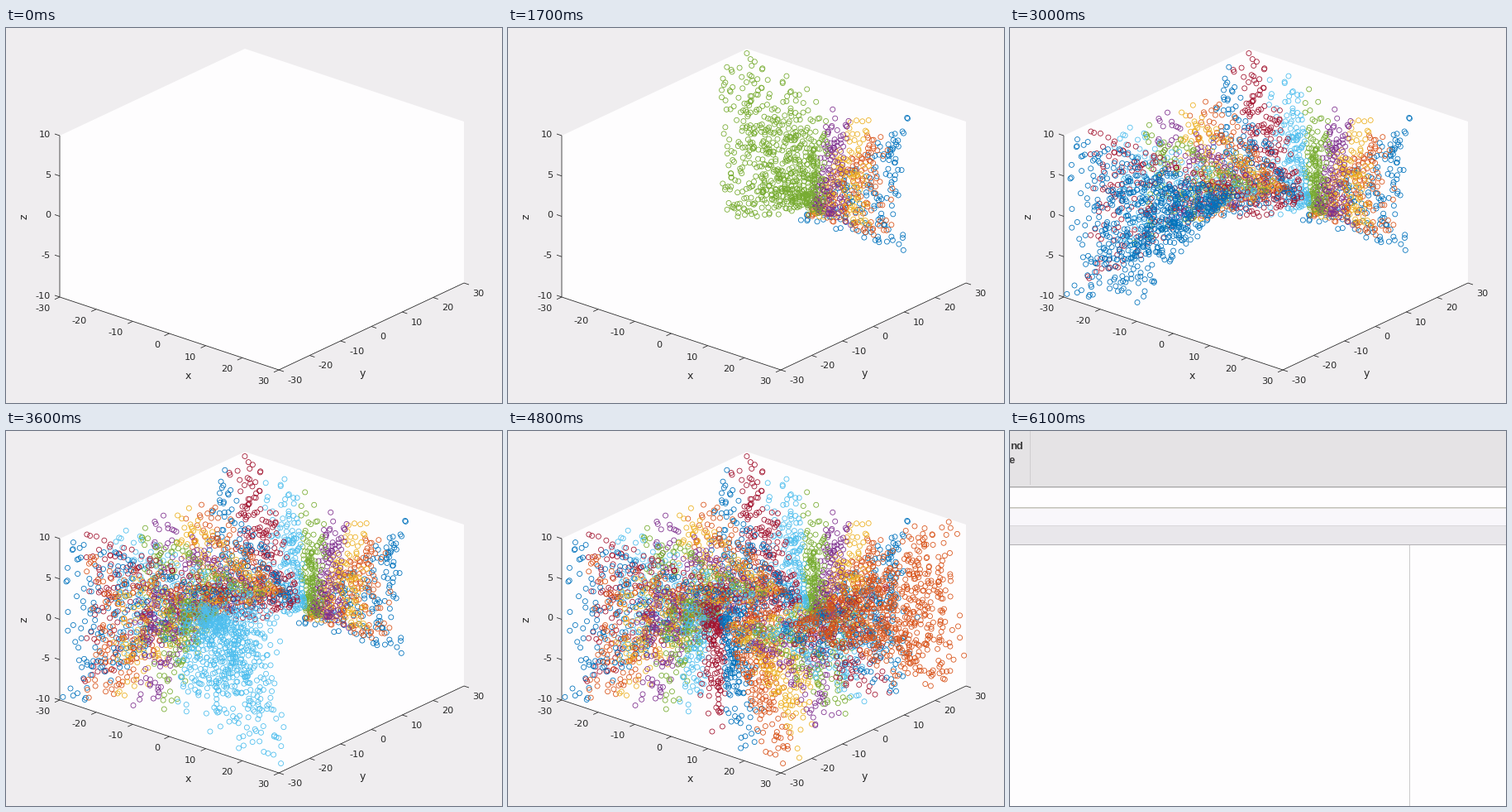
Animation, 600 px wide and 453 px high, one loop 6700 ms. Source, as a matplotlib script:

```python
import numpy as np
import matplotlib.pyplot as plt
from matplotlib.animation import FuncAnimation
from matplotlib.collections import LineCollection
from matplotlib.patches import Polygon, Rectangle

W, H, DPI = 600, 453, 100
PX = 72 / DPI
FRAMES, INTERVAL = 67, 100
DESKTOP_FRAME = 52
INK = "#262626"
COLORS = np.array(["#0072bd", "#d95319", "#edb120", "#7e2f8e",
                   "#77ac30", "#4dbeee", "#a2142f"])

# Sweep geometry: each beam leaves tangentially from a small circle.
START, STEP, SPREAD = 65, 11.25, 40
BATCHES = 32
N_POINTS = 5200


def project(x, y, z):
    """Orthographic view of the 60 x 60 x 20 box in stage pixels."""
    sx = 309.5 + 4.417 * x + 3.733 * y
    sy = 219 + 1.467 * x - 1.75 * y - 9.75 * z
    return sx, sy


def make_cloud():
    rng = np.random.default_rng(11)
    n = 3 * N_POINTS
    first = START + STEP
    phi = rng.uniform(first, START + STEP * BATCHES + STEP, n)
    r = 46 * rng.random(n) ** 0.6
    a, base = np.radians(phi), np.radians(phi - 75)
    x = 9.5 * np.cos(base) + r * np.cos(a)
    y = 9.5 * np.sin(base) + r * np.sin(a)
    z = r * rng.uniform(-0.29, 0.29, n)
    inside = (abs(x) < 29.8) & (abs(y) < 29.8) & (abs(z) < 9.8)
    keep = np.flatnonzero(inside)[:N_POINTS]
    keep = keep[np.argsort(phi[keep])]
    return phi[keep], np.column_stack(project(x[keep], y[keep], z[keep]))


def batch_at(frame):
    if frame < 11:
        return 0
    return int(np.interp(frame, [11, 13, 22, 30, 41, 48, 51],
                         [1, 2.5, 8.5, 15.5, 24.5, 30.5, BATCHES]))


fig = plt.figure(figsize=(W / DPI, H / DPI), dpi=DPI, facecolor="#efedef")
ax = fig.add_axes([0, 0, 1, 1])
ax.set_xlim(0, W)
ax.set_ylim(H, 0)
ax.axis("off")


def label(x, y, text, size=11.3, **kw):
    style = dict(family="DejaVu Sans", color=INK, va="baseline") | kw
    return ax.text(x, y, text, fontsize=size * PX, **style)


def draw_axes():
    corners = [(-30, -30, 10), (-30, 30, 10), (30, 30, 10),
               (30, 30, -10), (30, -30, -10), (-30, -30, -10)]
    outline = [project(*c) for c in corners]
    ax.add_patch(Polygon(outline, fc="#fefdfe", ec="none", zorder=0))

    lines = [[outline[0], outline[5], outline[4], outline[3]]]

    def tick(point, dx, dy):
        lines.append([point, (point[0] + dx, point[1] + dy)])

    for v in range(-30, 31, 10):
        p = project(v, -30, -10)
        tick(p, -6, 2.8)
        label(p[0] - 11.5, p[1] + 17, str(v), ha="right")
        p = project(30, v, -10)
        tick(p, 6, 2)
        label(p[0] + 10.5, p[1] + 15.5, str(v), ha="left")
    for v in range(-10, 11, 5):
        p = project(-30, -30, v)
        tick(p, -6, -2)
        label(p[0] - 11, p[1] + 2, str(v), ha="right")
    ax.add_collection(LineCollection(lines, colors=INK, linewidths=0.8 * PX,
                                     zorder=1))
    label(220, 424, "x", 12.5, ha="center")
    label(431, 421, "y", 12.5, ha="center")
    label(28, 228, "z", 12.5, ha="right", va="center", rotation=90)


def draw_desktop():
    """Plain application window that covers the plot at the end."""
    bands = [(0, 0, W, H, "#fefdfe"),
             (0, 0, W, 67, "#e5e3e5"),
             (0, 67, W, 1, "#a9a8a9"),
             (0, 68, W, 1, "#dcdbdc"),
             (0, 92, W, 1, "#c2c1b8"),
             (0, 93, W, 1, "#dddcd6"),
             (0, 94, W, 20, "#f9f7fb"),
             (0, 114, W, 1, "#d9d7da"),
             (0, 115, W, 22, "#e9e7eb"),
             (0, 137, W, 1, "#b3b1b4"),
             (24, 0, 1, 65, "#cfcdcf"),
             (483, 138, 1, H - 138, "#cbcacb")]
    parts = [ax.add_patch(Rectangle((x, y), w, h, fc=c, ec="none",
                                    antialiased=False, zorder=5))
             for x, y, w, h, c in bands]
    for x, y, text in [(15.5, 22.5, "nd"), (5.5, 39, "e")]:
        parts.append(label(x, y, text, 13, ha="right", weight="bold",
                           family="Liberation Sans", color="#3f3e3f",
                           zorder=6))
    return parts


draw_axes()
desktop = draw_desktop()
phi, cloud = make_cloud()
# The last batch whose sector still contains each point.
last_batch = np.floor((phi - START) / STEP).astype(int)
dots = ax.scatter([], [], s=(6 * PX) ** 2, marker="o", facecolors="none",
                  linewidths=0.8 * PX, zorder=3)


def update(frame):
    closed = frame >= DESKTOP_FRAME
    for part in desktop:
        part.set_visible(closed)
    dots.set_visible(not closed)

    batch = batch_at(frame)
    seen = phi <= START + STEP * batch + SPREAD
    if batch == 0:
        seen[:] = False
    owner = np.minimum(last_batch[seen], batch)
    dots.set_offsets(cloud[seen])
    dots.set_edgecolors(COLORS[(owner - 1) % len(COLORS)])
    return [dots, *desktop]


anim = FuncAnimation(fig, update, frames=FRAMES, interval=INTERVAL,
                     repeat=True, repeat_delay=0, blit=False)
plt.show()
```
